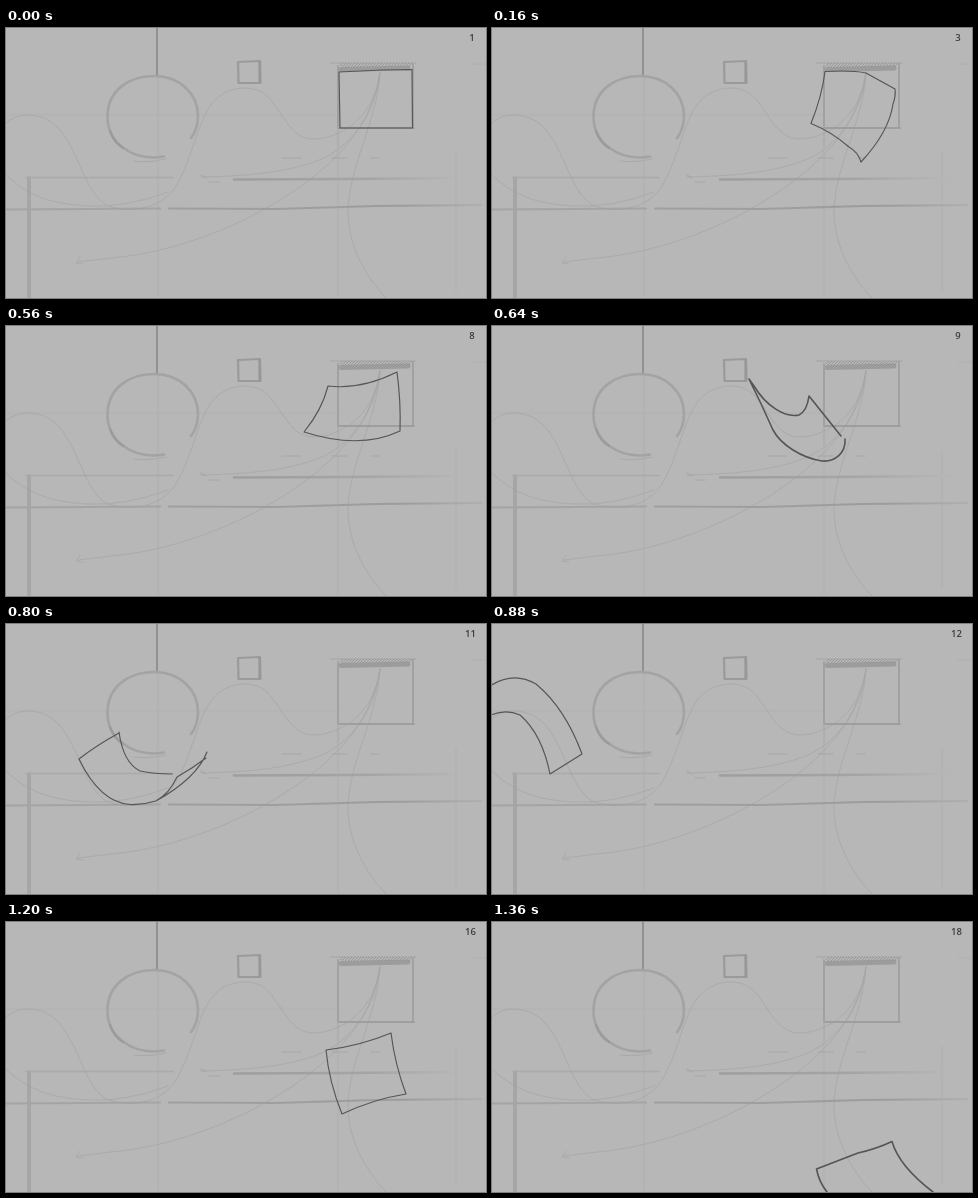
Recreate the animation shown at these times as an HTML page. Size 480 by 270 pixels, loop 1440 ms.

```html
<!DOCTYPE html>
<html lang="en">
<head>
<meta charset="utf-8">
<title>Falling cloth pencil test</title>
<style>
html, body { margin: 0; width: 100%; height: 100%; overflow: hidden; background: #b7b7b7; }
svg { display: block; width: 100vw; height: 100vh; }
path { fill: none; stroke-linecap: round; stroke-linejoin: round; }
.grid { stroke: #b0b0b0; stroke-width: 2.5; filter: url(#soft); }
.rough { stroke: #9c9c9c; stroke-width: 2.2; filter: url(#soft); opacity: .85; }
.arc { stroke: #9c9c9c; stroke-width: .6; opacity: .75; }
.pose { visibility: hidden; animation: show 1440ms step-end infinite; }
.pose path { stroke: #555; stroke-width: 1.15; }
.pose .bold { stroke-width: 1.6; }
.pose .light { stroke: #999; stroke-width: .7; }
text { font: 600 9.5px "Open Sans", sans-serif; fill: #3c3c3c; text-anchor: middle; }
@keyframes show {
  0% { visibility: visible; }
  5.5556%, 100% { visibility: hidden; }
}
</style>
</head>
<body>
<svg id="stage" viewBox="0 0 480 270">
  <defs>
    <filter id="soft" filterUnits="userSpaceOnUse" x="0" y="0" width="480" height="270"><feGaussianBlur stdDeviation=".7"/></filter>
    <pattern id="hatch" width="3" height="3" patternUnits="userSpaceOnUse">
      <path d="M0 3L3 0M-1 1L1 -1M2 4L4 2" stroke="#949494" stroke-width=".9"/>
    </pattern>
    <linearGradient id="fade" gradientUnits="userSpaceOnUse" x1="228" y1="0" x2="450" y2="0">
      <stop offset="0" stop-color="#9a9a9a"/>
      <stop offset=".6" stop-color="#a2a2a2"/>
      <stop offset="1" stop-color="#b6b6b6"/>
    </linearGradient>
    <linearGradient id="floor" gradientUnits="userSpaceOnUse" x1="163" y1="0" x2="475" y2="0">
      <stop offset="0" stop-color="#9c9c9c"/>
      <stop offset=".75" stop-color="#989898"/>
      <stop offset="1" stop-color="#aeaeae"/>
    </linearGradient>
  </defs>
  <rect width="480" height="270" fill="#b7b7b7"/>

  <g class="grid">
    <path d="M152 50V268M332 100V268M450 125V262" opacity=".45"/>
    <path d="M0 87H330" opacity=".3"/>
    <path d="M466 36H480" stroke-width="1"/>
  </g>

  <g class="rough">
    <path d="M151 0V48" stroke="#868686" stroke-width="1.8"/>
    <path d="M158 128.500C126 134 101 114 101.500 88C102 63 122 48 148 48C174 48 192 66 192 88Q192 101 185 110" stroke="#a0a0a0" stroke-width="2.600"/>
    <path d="M104 103Q108 115 117 120" stroke="#969696"/>
    <path d="M128 133Q143 135 160 131" stroke="#a8a8a8" stroke-width="1.200"/>
    <path d="M232 34L254 33L254.500 55L232.500 55Z" stroke="#969696"/>
    <path d="M253.500 34V54" stroke="#929292"/>
    <path d="M332 38V100H408M407 36V100" stroke="#9b9b9b" stroke-width="1.800"/>
    <path d="M332 100V118" stroke="#aaa" stroke-width="1"/>
    <path d="M324 35H410" stroke="#a0a0a0" stroke-width="1"/>
    <path d="M335 41.500L402 40" stroke="#989898" stroke-width="5"/>
    <path d="M23 150V269" stroke="#a4a4a4" stroke-width="4"/>
    <path d="M20 149.500H167" stroke="#a8a8a8" stroke-width="1.500"/>
    <path d="M0 181.500L80 181L154 180.500" stroke="#a2a2a2"/>
    <path d="M163 180.500L270 181L370 178L475 177" stroke="url(#floor)"/>
    <path d="M228 151.500L340 151L455 150" stroke="url(#fade)" stroke-width="2.500"/>
    <path d="M276 130H295M326 130H341M365 130H373M195 147L200 150M203 154H213" stroke="#a6a6a6" stroke-width="1.200"/>
  </g>
  <path d="M334 35H408L404 39H334Z" style="fill:url(#hatch)"/>

  <g class="arc">
    <path d="M0 95C10 86 24 85 38 90C72 104 74 164 102 178C128 186 156 180 170 158C188 128 192 88 210 71C224 58 248 56 261 68C276 83 284 110 306 111C322 111 332 106 345 98Q370 79 374 45"/>
    <path d="M0 147C20 166 42 176 82 178Q120 180 162 164"/>
    <path d="M195 149C250 148 288 143 318 130Q363 108 374 45"/>
    <path d="M374 45C370 90 337 126 302 153C242 198 166 225 105 230L72 234M74 229L70 235L77 236"/>
    <path d="M374 45C371 94 343 138 342 183C342 216 358 247 380 270"/>
  </g>
</svg>
<script>
// One pose per 80 ms: a drop, a ride along the wave, a fall.
// Lines after "|" are drawn faintly.
const poses = [
  "M333 44L375 42L406 41.500L406.500 100L334 100Z",
  "M333 43.500Q365 42 391 44L405 53Q402 86 389 114Q365 100 327 98Q332 70 333 43.500Z",
  "M333 43.500Q360 42 374 45L403 61Q404 68 401 76Q397 104 369 134Q366 124 357 119Q340 104 319 95.500Q330 68 333 43.500Z",
  "M312 82Q350 86 384 104Q366 139 340 172Q318 146 284 134Q303 110 312 82Z",
  "M246 143Q289 153 325 172Q297 203 265 230Q232 198 187 182Q221 164 246 143Z",
  "M76 208.500Q122 206 168 193.500Q205 219 248 236M76 208.500Q110 242 150 270|M247 237L189 270",
  "M333 46Q366 41 407 43L406 100Q368 102 332 106Z",
  "M322 60Q355 64 391 46Q395 76 394 105Q354 124 298 106Q316 84 322 60Z",
  "M257 53L262 60C274 80 293 92 307 89Q315 85 317 70L349 110M353 113C354 127 343 136 330 135C310 132 289 119 281 104Q270 79 257 53",
  "M184 112Q195 45 232 34Q262 32 282 73L262 104Q247 67 231 67Q212 73 206 128Z",
  "M113 109Q91 121 73 135C86 162 103 179 124 180.500Q137 181 150 177Q191 154 201 128M113 108C116 130 124 142 134 147Q148 150 166 150M200 134Q187 144 171 153Q163 170 150 177",
  "M-5 64Q20 46 44 60Q73 84 90 130L58 150Q50 110 28 91Q12 84 -5 93",
  "M-5 88Q18 92 26 120L8 150L-5 140",
  "M334 51Q350 48 361 43Q380 41 408 43Q405 72 406 101Q371 97 332 113Q335 82 334 51Z",
  "M336 80Q366 74 403 61Q403 91 408 121Q375 128 342 145Q335 113 336 80Z",
  "M320 128Q354 124 385 111Q389 143 400 172Q368 177 336 192Q323 160 320 128Z",
  "M319 188Q354 180 388 165Q397 197 417 223Q378 231 343 249Q325 220 319 188Z",
  "M335 270Q327 260 324.500 247Q348 238 366 231Q384 227 400 219.500Q407 244 441 270"
];
const bold = [9, 14, 18];
const ns = "http://www.w3.org/2000/svg";

function add(parent, tag, attrs) {
  const el = document.createElementNS(ns, tag);
  for (const key in attrs) el.setAttribute(key, attrs[key]);
  return parent.appendChild(el);
}

const stage = document.getElementById("stage");
poses.forEach((lines, i) => {
  const n = i + 1;
  const [main, light] = lines.split("|");
  const pose = add(stage, "g", { class: "pose" });
  pose.style.animationDelay = (i - poses.length) * 80 + "ms";
  add(pose, "path", { d: main, class: bold.includes(n) ? "bold" : "line" });
  if (light) add(pose, "path", { d: light, class: "light" });
  add(pose, "text", { x: n < 10 ? 466 : 464.5, y: 13 }).textContent = n;
});
</script>
</body>
</html>
```
